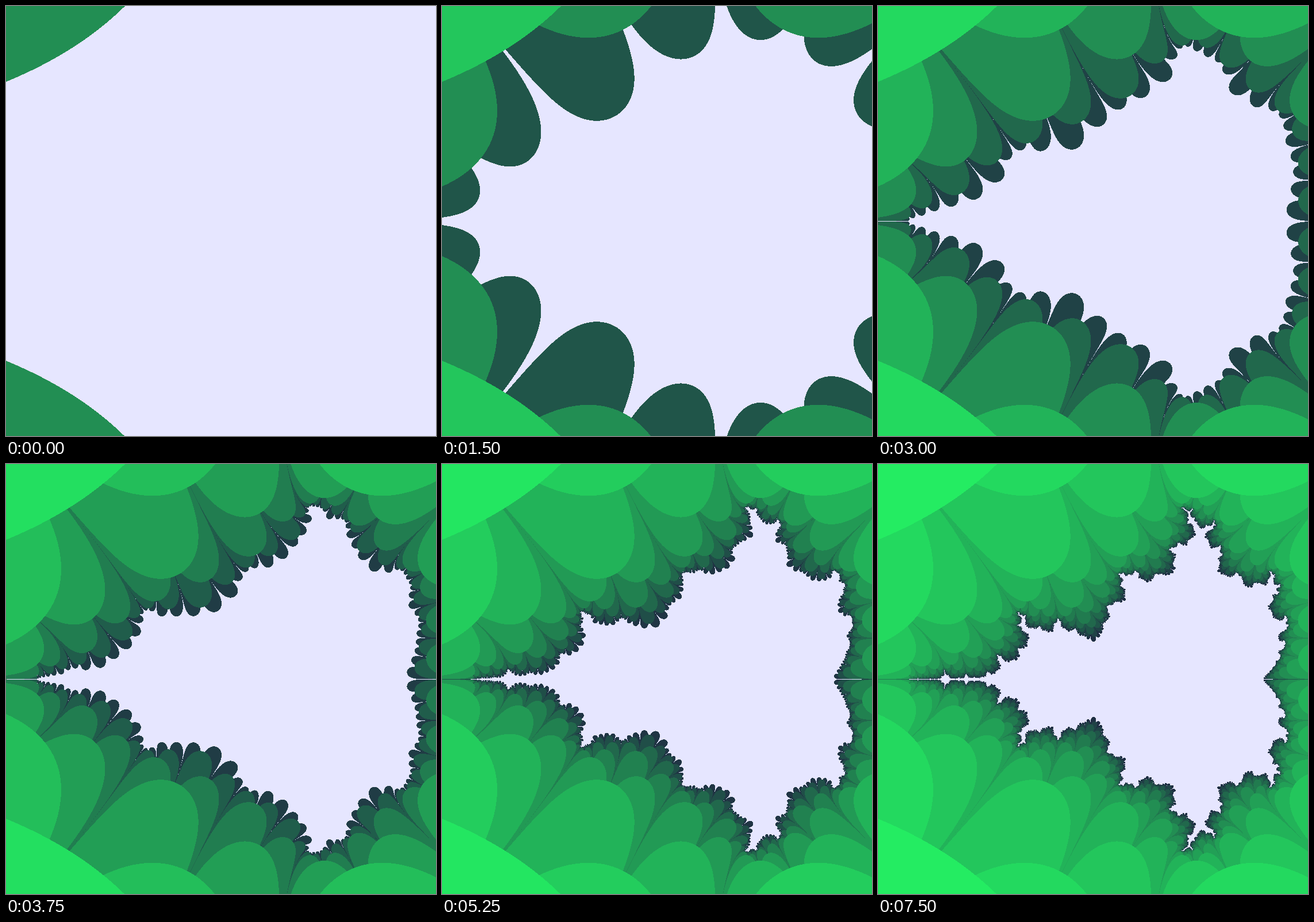
An HTML page with a canvas that plays this animation: 748x748 px, repeating every 8000 ms.

```html
<!DOCTYPE html>
<html lang="en">
<head>
<meta charset="utf-8">
<title>Escape bands</title>
<style>
  html, body { margin: 0; width: 100%; height: 100%; overflow: hidden; background: #e6e6ff; }
  canvas { display: block; width: 100%; height: 100%; image-rendering: pixelated; }
</style>
</head>
<body>
<canvas id="stage" width="748" height="748"></canvas>
<script>
const SIZE = 748, SPAN = 2.8, LEFT = -2.2, TOP = 1.4;
const LOOP = 8000, STEP = 750, MAX_DEPTH = 11;
const INSIDE = [230, 230, 255], NEAR = [36, 255, 101], FAR = [31, 28, 64];

const ctx = document.getElementById('stage').getContext('2d');
const image = ctx.createImageData(SIZE, SIZE);
const pixels = new Uint32Array(image.data.buffer);

const pack = ([r, g, b]) => (255 << 24 | b << 16 | g << 8 | r) >>> 0;
const mix = u => NEAR.map((v, i) => Math.round(v + (FAR[i] - v) * u));

// Iterations of z² + c until |Re z · Im z| exceeds 2; 0 means it stays inside.
function escapeDepth(cx, cy) {
  let x = cx, y = cy;
  for (let k = 1; k <= MAX_DEPTH; k++) {
    // The second test lets points on the real axis escape too.
    if (Math.abs(x * y) > 2 || Math.abs(x) > 1.59e5) return k;
    [x, y] = [x * x - y * y + cx, 2 * x * y + cy];
  }
  return 0;
}

const depths = new Uint8Array(SIZE * SIZE);
for (let row = 0; row < SIZE; row++) {
  const cy = TOP - row * SPAN / SIZE;
  for (let col = 0; col < SIZE; col++) {
    depths[row * SIZE + col] = escapeDepth(LEFT + col * SPAN / SIZE, cy);
  }
}

function paint(limit) {
  const palette = new Uint32Array(MAX_DEPTH + 1).fill(pack(INSIDE));
  for (let k = 1; k <= limit; k++) palette[k] = pack(mix(k / (limit + 1)));
  for (let i = 0; i < depths.length; i++) pixels[i] = palette[depths[i]];
  ctx.putImageData(image, 0, 0);
}

let shown = 0;
const start = performance.now();

function tick() {
  const time = (performance.now() - start) % LOOP;
  const limit = Math.min(MAX_DEPTH, Math.floor(time / STEP) + 1);
  if (limit !== shown) paint(shown = limit);
  requestAnimationFrame(tick);
}
tick();
</script>
</body>
</html>
```
